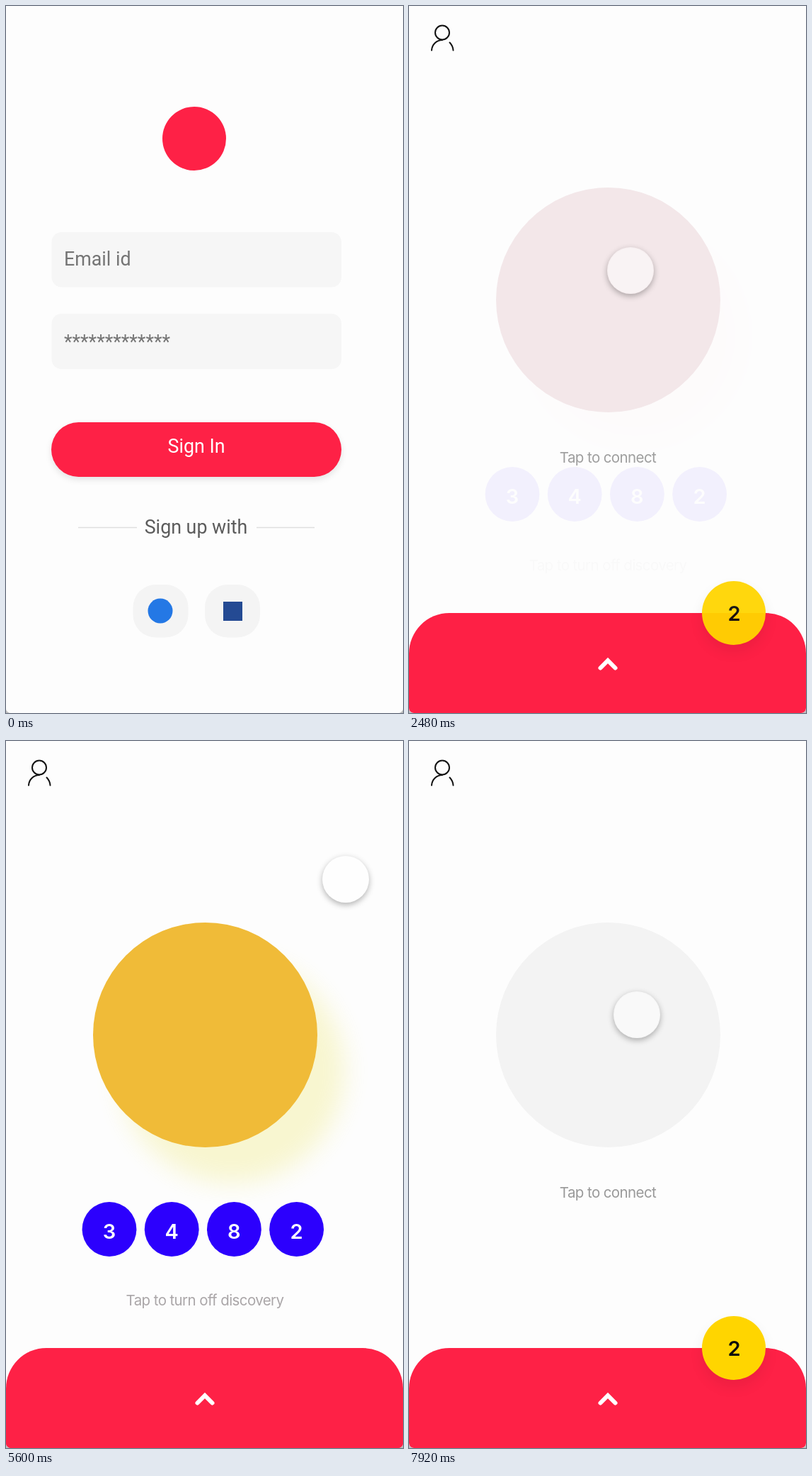
Write an HTML page that moves like this. It is 561 by 997 pixels and loops after 8000 ms.

```html
<!DOCTYPE html>
<html lang="en">
<head>
<meta charset="utf-8">
<title>Sign in and connect</title>
<style>
  :root { --red: #fe2146; --page: #fdfdfd; --loop: 8s linear infinite; }
  html, body { margin: 0; width: 100%; height: 100%; overflow: hidden; background: #bdbdbd; }
  #stage {
    position: relative; width: 561px; height: 997px; overflow: hidden;
    border-radius: 0 0 7px 7px; background: var(--page);
  }
  svg, .screen { position: absolute; left: 0; top: 0; width: 561px; height: 997px; }
  .screen { background: var(--page); }
  .login text { font: 26.8px Roboto, sans-serif; }
  .hint { font: 20.5px Inter, sans-serif; letter-spacing: -.6px; text-anchor: middle; }
  .digit { font: 600 29px Inter, sans-serif; text-anchor: middle; }
  .orb, .badge, #pointer { position: absolute; border-radius: 50%; }
  .orb { left: 122.5px; top: 256px; width: 317px; height: 317px; background: #f3f3f3; }
  .badge {
    left: 414px; top: 811px; width: 90px; height: 90px; background: #ffd500;
    box-shadow: 0 10px 20px rgba(0, 0, 0, .07);
  }
  .button {
    position: absolute; left: 64px; top: 587px; width: 410px; height: 77px;
    border-radius: 39px; background: var(--red); box-shadow: 0 4px 10px rgba(0, 0, 0, .1);
  }
  #pointer {
    left: -33px; top: -33px; width: 66px; height: 66px; box-sizing: border-box;
    background: rgba(255, 255, 255, .5); border: 1px solid rgba(255, 255, 255, .3);
    background-clip: padding-box; box-shadow: 0 3px 8px rgba(0, 0, 0, .3);
    animation: travel var(--loop), appear var(--loop);
  }
  #home { animation: open-home var(--loop); }
  #live { animation: go-live var(--loop); }
  #live .orb { animation: pulse var(--loop); }

  @keyframes open-home { 0%, 13.4% { opacity: 0 } 21.9%, 100% { opacity: 1 } }
  @keyframes go-live {
    0%, 30.6% { opacity: 0 }
    38.5%, 93.4% { opacity: 1 }
    98.4%, 100% { opacity: 0 }
  }
  @keyframes pulse {
    0%, 45% { background: #ff2145; box-shadow: 38px 50px 45px rgba(255, 33, 69, .2) }
    57% { background: #fc566a; box-shadow: 38px 50px 45px rgba(250, 60, 85, .2) }
    70%, 74% { background: #f0bb38; box-shadow: 38px 50px 35px rgba(228, 218, 30, .2) }
    86%, 100% { background: #fb4a4a; box-shadow: 38px 50px 45px rgba(255, 50, 80, .22) }
  }
  @keyframes appear { 0%, .5% { opacity: 0 } 2.5%, 100% { opacity: 1 } }
  @keyframes travel {
    0%, 2% { transform: translate(372px, 85px); animation-timing-function: ease-in-out }
    10.5%, 22.5% { transform: translate(286px, 614px); animation-timing-function: ease-in-out }
    28.5%, 41% { transform: translate(313px, 373px); animation-timing-function: ease-in-out }
    49%, 89.2% { transform: translate(480px, 195px); animation-timing-function: ease-in-out }
    93%, 100% { transform: translate(322px, 386px) }
  }
</style>
</head>
<body>
<div id="stage">
  <svg width="0" height="0">
    <defs>
      <g id="frame">
        <g fill="none" stroke="#111" stroke-width="2" stroke-linecap="round">
          <circle cx="47" cy="37.5" r="10"/>
          <path d="M32 62.5A15.2 15.2 0 0 1 47 48M57.5 51.5Q62 56 62.5 62.5"/>
        </g>
        <path d="M0 997V913A57 57 0 0 1 57 856H504A57 57 0 0 1 561 913V997Z" fill="#fe2146"/>
        <path d="M270.5 933.5L281 923L291.5 933.5" fill="none" stroke="#fff" stroke-width="6" stroke-linecap="round"/>
      </g>
    </defs>
  </svg>

  <div class="screen login">
    <div class="button"></div>
    <svg viewBox="0 0 561 997">
      <circle cx="266" cy="187" r="45" fill="#fe2146"/>
      <g fill="#f6f6f6">
        <rect x="64.5" y="319" width="409.5" height="77.5" rx="14"/>
        <rect x="64.5" y="434" width="409.5" height="78" rx="14"/>
      </g>
      <g fill="#f4f4f4">
        <rect x="179.500" y="816" width="78" height="74.500" rx="32"/>
        <rect x="281" y="816" width="78" height="74.500" rx="32"/>
      </g>
      <circle cx="218" cy="853" r="17.5" fill="#2478e5"/>
      <rect x="307" y="840" width="27" height="27" fill="#244a93"/>
      <path d="M102 735.5H185M354 735.5H436" stroke="#dedede" stroke-width="1.5"/>
      <g fill="#747474">
        <text x="82" y="365.500">Email id</text>
        <text x="82" y="483">*************</text>
      </g>
      <g text-anchor="middle">
        <text x="269" y="630" fill="#fff">Sign In</text>
        <text x="268.500" y="744" fill="#5c5c5c">Sign up with</text>
      </g>
    </svg>
  </div>

  <div class="screen" id="home">
    <div class="orb"></div>
    <svg viewBox="0 0 561 997">
      <use href="#frame"/>
      <text class="hint" x="281" y="643.500" fill="#999">Tap to connect</text>
    </svg>
    <div class="badge"></div>
    <svg viewBox="0 0 561 997"><text class="digit" x="459.500" y="867" fill="#0c0c0c">2</text></svg>
  </div>

  <div class="screen" id="live">
    <div class="orb"></div>
    <svg viewBox="0 0 561 997">
      <use href="#frame"/>
      <g fill="#2c00fd">
        <circle cx="146" cy="688.500" r="38.400"/>
        <circle cx="234.200" cy="688.500" r="38.400"/>
        <circle cx="322.400" cy="688.500" r="38.400"/>
        <circle cx="410.600" cy="688.500" r="38.400"/>
      </g>
      <g class="digit" fill="#fff">
        <text x="146" y="702">3</text>
        <text x="234.200" y="702">4</text>
        <text x="322.400" y="702">8</text>
        <text x="410.600" y="702">2</text>
      </g>
      <text class="hint" x="281" y="796" fill="#aaa6a8">Tap to turn off discovery</text>
    </svg>
  </div>

  <div id="pointer"></div>
</div>
</body>
</html>
```
